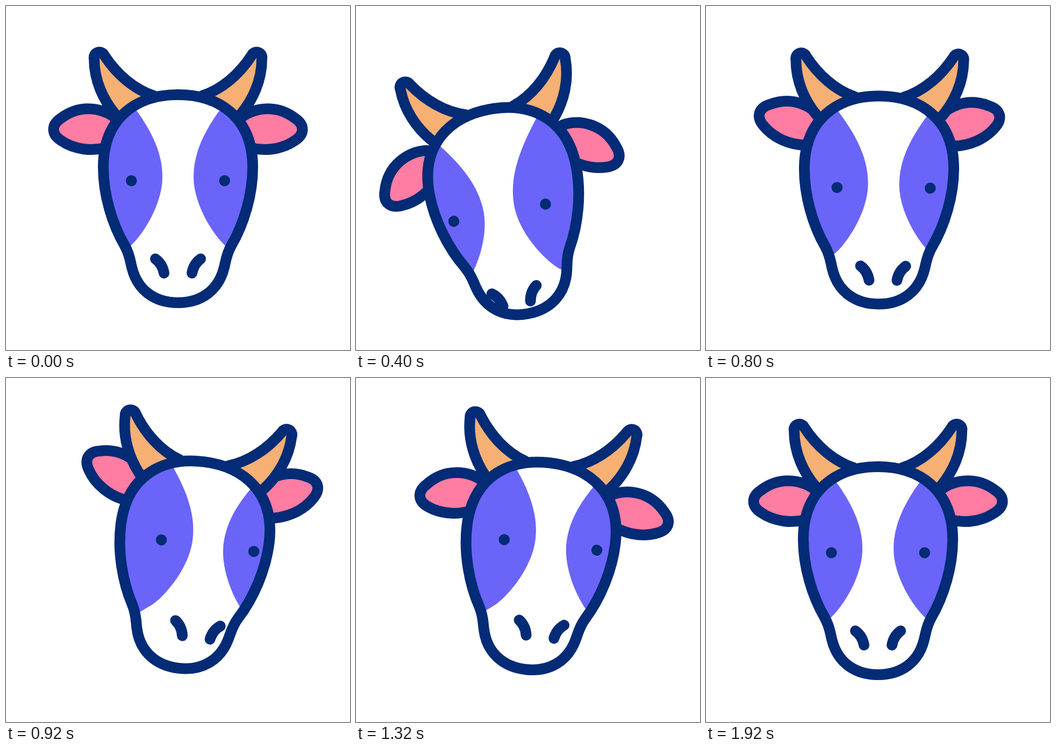
An HTML page that plays this animation: 640x640 px, repeating every 2 s.

```html
<!DOCTYPE html>
<html lang="en">
<head>
<meta charset="utf-8">
<title>Cow shaking its head</title>
<style>
  html, body { margin: 0; width: 100%; height: 100%; overflow: hidden; background: #fff; }
  svg { display: block; width: 100vw; height: 100vh; }
  .line { stroke: #042b76; stroke-width: 20; stroke-linecap: round; stroke-linejoin: round; }
</style>
</head>
<body>
<svg viewBox="0 0 640 640">
  <defs>
    <path id="skull" d="M320 165C395 165 459 206 459 300C459 350 443 405 419 446C410 462 409 474 406 486C396 528 364 552 320 552C276 552 244 528 234 486C231 474 230 462 221 446C197 405 181 350 181 300C181 206 245 165 320 165Z"/>
    <clipPath id="inside"><use href="#skull"/></clipPath>
    <path id="ear" class="line" fill="#ff7da2" d="M430 214C455 190 500 180 538 209C556 221 556 238 538 250C512 268 480 270 455 264L430 255Z"/>
    <path id="horn" class="line" fill="#f6b074" d="M222 218L203 201C182 176 164 140 164 98A10 10 0 0 1 183 92C206 127 238 155 275 167L285 182Z"/>
    <path id="spot" fill="#6a65f8" d="M218 162C260 214 291 262 291 318C291 368 256 424 232 446L150 510H60V120Z"/>
    <g id="features">
      <circle cx="233.3" cy="325" r="10.3" fill="#042b76"/>
      <path class="line" fill="none" d="M278 470.5Q291 480 294 497"/>
    </g>
  </defs>
  <g id="head">
    <g transform="matrix(-1 0 0 1 640 0)"><use class="ear" href="#ear"/></g>
    <use class="ear" href="#ear"/>
    <use href="#horn"/>
    <use href="#horn" transform="matrix(-1 0 0 1 640 0)"/>
    <use href="#skull" fill="#fff"/>
    <g clip-path="url(#inside)">
      <g class="face">
        <use href="#spot"/>
        <use href="#spot" transform="matrix(-1 0 0 1 640 0)"/>
      </g>
    </g>
    <use href="#skull" class="line" fill="none"/>
    <g class="face">
      <use href="#features"/>
      <use href="#features" transform="matrix(-1 0 0 1 640 0)"/>
    </g>
  </g>
</svg>
<script>
  const LOOP = 2000, STEP = 40;
  const LEFT = 510, RIGHT = 1050;   // when the head is furthest to each side
  const FLAP = 500, FIRST_FLAP = 420;
  const head = document.getElementById('head');
  const faces = document.querySelectorAll('.face');
  const ears = document.querySelectorAll('.ear');

  function ease(t, from, to) {
    const u = Math.min(1, Math.max(0, (t - from) / (to - from)));
    return u * u * (3 - 2 * u);
  }

  // Swings from rest to one side, then to the other, and back to rest.
  function sway(t, rest) {
    const across = ease(t, LEFT, RIGHT);
    const left = ease(t, 0, LEFT) * (1 - across);
    const right = across * (1 - ease(t, RIGHT, rest));
    return (leftPose, rightPose) => left * leftPose + right * rightPose;
  }

  // The ears flap to and fro, a third weaker each time, and stop after three flaps.
  function droop(t) {
    const peak = k => k < 0 || k > 2 ? 0 : 36 * (-0.67) ** k;
    const k = Math.floor((t - FIRST_FLAP) / FLAP);
    const start = k < 0 ? 0 : FIRST_FLAP + k * FLAP;
    const amount = ease(t, start, FIRST_FLAP + (k + 1) * FLAP);
    return peak(k) + (peak(k + 1) - peak(k)) * amount;
  }

  function draw(time) {
    const t = Math.floor((time % LOOP) / STEP) * STEP;
    const turn = sway(t, 1700), shift = sway(t, 1590), look = sway(t - 15, 1590);
    head.setAttribute('transform',
      `translate(${shift(-40.5, 35.2)} ${shift(27, -17)}) rotate(${turn(-12.1, 10.4)} 320 360)`);
    for (const face of faces)
      face.setAttribute('transform', `translate(${look(-20, 36)} ${look(38.5, -15.6)})`);
    for (const ear of ears)
      ear.setAttribute('transform', `rotate(${droop(t)} 432 245)`);
  }

  const start = performance.now();
  function tick() {
    draw(performance.now() - start);
    requestAnimationFrame(tick);
  }
  tick();
</script>
</body>
</html>
```
